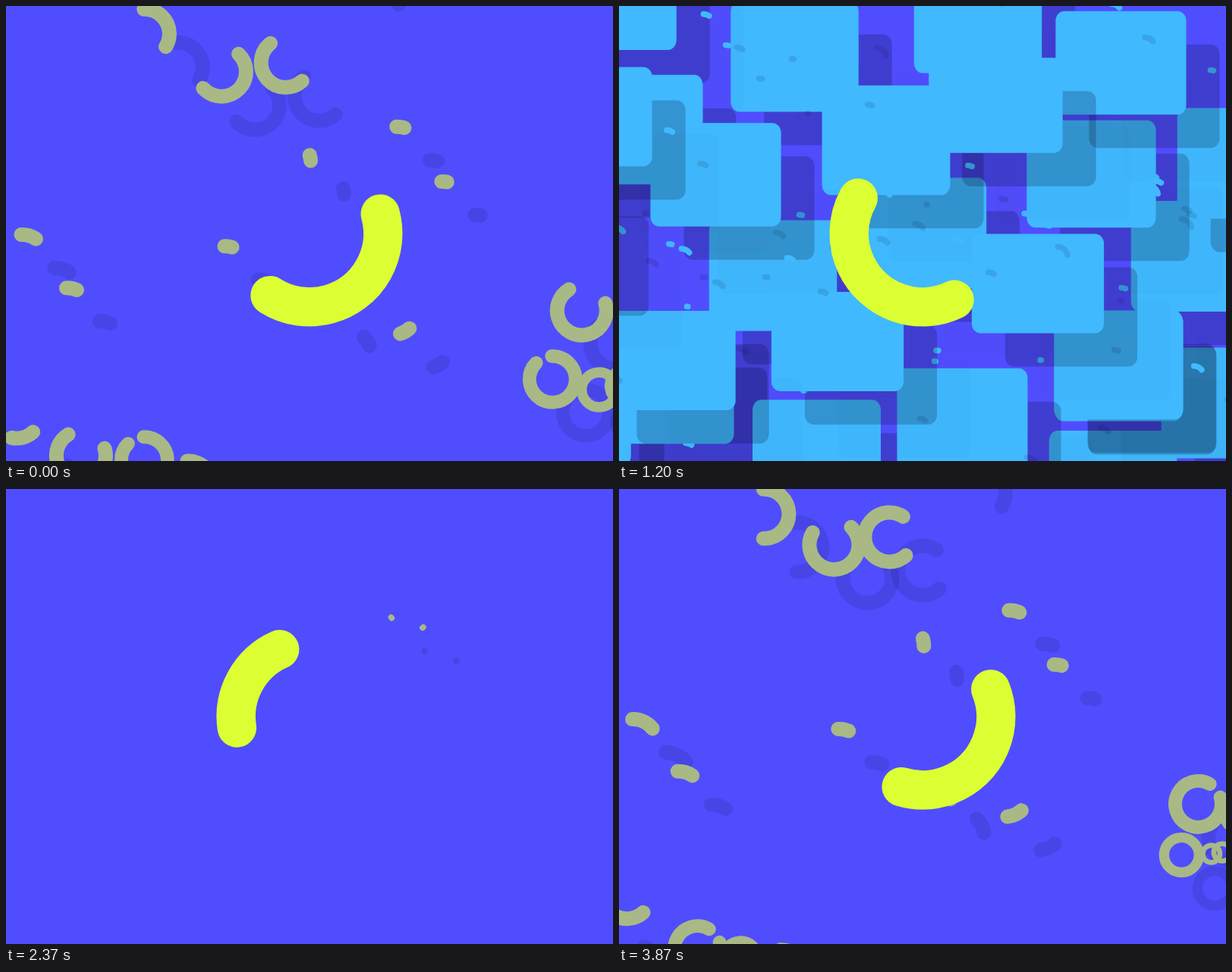
Animation of 800 by 600 pixels, one loop 3.9 s. Source, as an HTML page with a canvas:

```html
<!DOCTYPE html>
<html>
<head>
<meta charset="utf-8">
<style>
html, body { margin: 0; width: 100%; height: 100%; overflow: hidden; background: #504dff; }
canvas { display: block; }
</style>
</head>
<body>
<canvas id="stage" width="800" height="600"></canvas>
<script>
const ctx = document.getElementById('stage').getContext('2d');
const LOOP = 3900, CYCLE = 1950, SWITCH = 450, STEP = 30, DROP = 44;
const BLUE = '#40b9ff', OLIVE = '#a8b985', YELLOW = '#dcff33';
const TAU = 2 * Math.PI, DEG = TAU / 360;

// Card centres in the zoomed-out view; each wave starts one step after the one before
const WAVES = [
  [[400, 299.5], [231.5, 66.5], [473, 15.5], [651, 633], [799, 523.5]],
  [],
  [[203, 355.5], [-8.5, -15], [-68.5, 534], [759, 330]],
  [[820, 207.5]],
  [[658.5, 474.5]],
  [[352, 177], [26, 163], [67, 505], [260.5, 591.5]],
  [[622.5, 221.5], [658.5, 474.5]],
  [[661.5, 75], [127.5, 222.5], [452.5, 546]],
  [[552, 366], [288, 442.5], [66.5, 467.5], [-43.5, 146], [-92, 299]],
  [[496.5, 131]]
];

// Rings of a burst, one row per step: end point and start angle
const BLUE_BURST = {
  birth: 53, lead: .3, color: BLUE, rows: [
    [[395, -312, -90], [-510, 375, -90]],
    [[100, 412, -90], [532, 315, -90], [-532, -283, -90]]
  ]
};
const OLIVE_BURST = {
  birth: 955, lead: 0, color: OLIVE, rows: [
    [[-31, -93, -17], [176, -35, -92]],
    [[117, -108, -92], [-112, 51, -92]],
    [[5, 119, -46], [112, 104, 48]]
  ]
};

const mod = (a, n) => ((a % n) + n) % n;
const mix = (a, b, p) => a + (b - a) * p;
const part = (x, from, to) => Math.min(1, Math.max(0, (x - from) / (to - from)));
const sineOut = p => Math.sin(p * TAU / 4);
const smooth = p => p * p * (3 - 2 * p);
const circIn = p => 1 - Math.sqrt(1 - p * p);

// Opens from a bar, settles to a squarer shape, then shrinks away
function cardSize(age) {
  const open = sineOut(part(age, -15, 150));
  const settle = smooth(part(age, 200, 440));
  const left = 1 - circIn(part(age, 745, 990));
  return [mix(180 * open, 168.5, settle) * left, mix(146 - 30 * open, 146, settle) * left];
}

// Flies out while it grows, and its arc runs down to a dot
function ringPose(age) {
  return {
    travel: 1 - Math.exp(-Math.pow(age / 104, 1.35)),
    size: sineOut(part(age, 0, 110)),
    sweep: 359 / (1 + Math.pow(age / 147, 3.7))
  };
}

function card(x, y, w, h, color) {
  ctx.fillStyle = color;
  ctx.beginPath();
  ctx.roundRect(x - w / 2, y - h / 2, w, h, { x: w * .067, y: h * .095 });
  ctx.fill();
}

function arc(x, y, r, width, from, to, color) {
  ctx.strokeStyle = color;
  ctx.lineWidth = width;
  ctx.beginPath();
  ctx.arc(x, y, r, from * DEG, to * DEG);
  ctx.stroke();
}

function burst({ birth, lead, color, rows }, placeAge, x, y, k) {
  const rings = [];
  rows.forEach((row, i) => {
    const age = placeAge - birth - i * STEP;
    if (age <= 0 || age > 457) return;
    const { travel, size, sweep } = ringPose(age);
    const reach = mix(lead, 1, travel) * k;
    for (const [dx, dy, start] of row) {
      rings.push([x + dx * reach, y + dy * reach, 32.5 * size * k, 19 * size * k, start, start + sweep]);
    }
  });
  for (const [cx, cy, ...rest] of rings) arc(cx + DROP, cy + DROP, ...rest, 'rgba(0,0,30,.11)');
  for (const ring of rings) arc(...ring, color);
}

function draw(t) {
  const k = t >= SWITCH && t < SWITCH + CYCLE ? .4 : 1, zoom = k / .4;
  const phase = SWITCH + mod(t - SWITCH, CYCLE);

  ctx.fillStyle = '#504dff';
  ctx.fillRect(0, 0, 800, 600);
  ctx.lineCap = 'round';

  WAVES.forEach((places, wave) => {
    const age = phase - 640 - wave * STEP;
    const [w, h] = cardSize(age).map(v => v * zoom);
    for (const [px, py] of places) {
      const x = 400 + (px - 400) * zoom, y = 300 + (py - 300) * zoom;
      burst(BLUE_BURST, age, x, y, k);
      if (w > 0) {
        card(x + 2 * DROP, y + 2 * DROP, w, h, 'rgba(0,0,30,.015)');
        card(x + DROP, y + DROP, w, h, 'rgba(0,0,25,.2)');
        card(x, y, w, h, BLUE);
      }
      burst(OLIVE_BURST, age, x, y, k);
    }
  });

  // The spinner turns evenly while its length breathes twice a cycle
  const middle = 53.5 + 720 * t / CYCLE;
  const half = (95 + 62 * Math.cos(TAU * (t - 125) * 2 / CYCLE)) / 2;
  arc(400, 300, 96.8, 51.5, middle - half, middle + half, YELLOW);
}

const begin = performance.now();
function tick() {
  const t = mod(performance.now() - begin, LOOP);
  draw(Math.floor(t / 30) * 30);
  requestAnimationFrame(tick);
}
tick();
</script>
</body>
</html>
```
